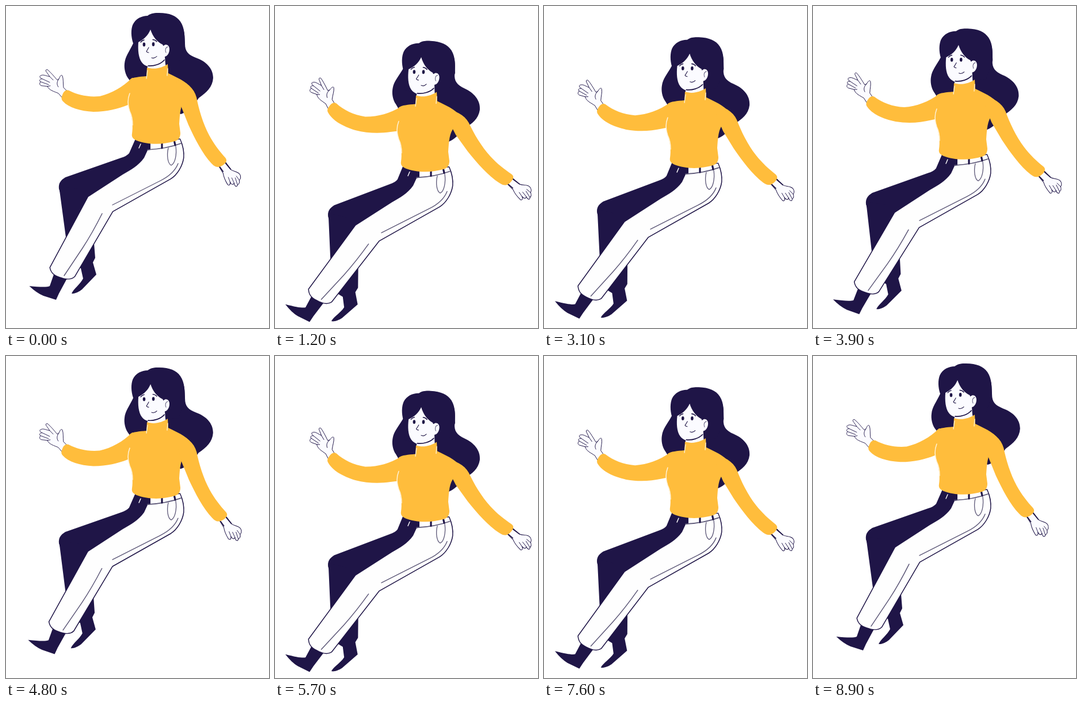
Recreate the animation shown at these times as an HTML page with a canvas. Size 457 by 560 pixels, loop 9 s.

```html
<!DOCTYPE html>
<html lang="en">
<head>
<meta charset="utf-8">
<title>Floating woman</title>
<style>
html, body { margin: 0; width: 100%; height: 100%; overflow: hidden; background: #fff; }
canvas { display: block; width: 457px; height: 560px; }
</style>
</head>
<body>
<canvas id="stage" width="457" height="560"></canvas>
<script>
const ctx = document.getElementById('stage').getContext('2d');
const NAVY = '#1f1547', YELLOW = '#ffbd3c', SKIN = '#fbfbff', CLOTH = '#fefefe';
const CREAM = '#fff3d8', SEAM = '#5d5878';
const LOOP = 9000, BOB = 2250, STEP = 100, RISE = 49;

const fill = (d, color) => {
  ctx.fillStyle = color;
  ctx.fill(new Path2D(d));
};
const line = (d, color = NAVY, width = 1.2) => {
  ctx.strokeStyle = color;
  ctx.lineWidth = width;
  ctx.stroke(new Path2D(d));
};

// One swing per bob, from 0 to 1 and back; power sharpens the crest.
const swing = (t, lag = 0, power = 1) =>
  ((1 - Math.cos(2 * Math.PI * (t - lag) / BOB)) / 2) ** power;

// Draws a part turned around its joint, with an optional shift down.
function joint(x, y, deg, draw, drop = 0) {
  ctx.save();
  ctx.translate(x, y + drop);
  ctx.rotate(deg * Math.PI / 180);
  ctx.translate(-x, -y);
  draw();
  ctx.restore();
}

function head(s) {
  joint(285, 50, 2.5 * s, () => fill(`M230 40 L302 30 C312 42 310 54 311 66
    C311 79 317 85 330 90 C347 96 360 108 360 125 C359 141 349 150 335 160
    C326 174 316 184 304 188 L240 165 L214 128 C207 120 205 108 206 100
    C207 88 214 80 221 65Z`, NAVY));
  fill(`M246 17 C252 12 260 12 266 12 C284 12 296 17 303 27 C311 39 310 52 311 66
    L300 100 L225 100 L221 65 C217 53 217 41 220 33 C225 22 236 17 246 17Z`, NAVY);
  fill(`M251 41 C247 51 240 58 230 63 C229 76 230 90 236 98 C239 102 243 104 246 105
    L245 116 L281 116 L277 101 L276 88 C281 87 284 81 284 75 C284 68 278 65 274 69
    C272 70 273 67 272 67 C262 62 255 53 251 41Z`, SKIN);
  line('M247 104 C257 105 269 101 275 94', NAVY, 1.7);
  fill('M242.2 67 A2.3 3.4 0 1 1 237.6 67 A2.3 3.4 0 1 1 242.2 67Z M258.3 66.5 A2.3 3.4 0 1 1 253.7 66.5 A2.3 3.4 0 1 1 258.3 66.5Z', NAVY);
  line('M234 63 Q236 60 240 59 M255 58.5 Q259 58.5 262 62', NAVY, 1.4);
  line('M248 72 Q246 76 244 79 Q245 81 248 81 M253 90 Q258 92 262 87.5', NAVY, 1.1);
  line('M281 71 C277 72 276 77 278 81', SEAM, 1);
}

function leftArm() {
  const hand = `M105 147 L100 142 C99 134 100 127 98 122 C97 119 94 121 92 127
    L89 129 C83 122 77 115 72 111 C69 110 68 113 71 116 L76 123
    C70 122 65 119 61 121 C57 122 59 126 63 127 C59 127 57 130 60 132
    C58 135 58 138 62 139 L72 140 C75 147 84 149 91 152 L98 160Z`;
  fill(hand, SKIN);
  line(hand, NAVY, 0.9);
  line('M76 123 L82 129 M63 127 L76 133 M60 132 L74 137 M92 127 C88 132 88 137 91 141 M72 140 L77 139', NAVY, 0.9);
  fill(`M219 125 C203 141 184 152 163 157 C143 159 124 155 109 147 C104 145 100 149 98 155
    C96 159 96 163 99 166 C109 177 129 183 152 184 C175 184 195 179 212 172 L238 162 L230 126Z`, YELLOW);
}

function rightArm() {
  const hand = `M368 276 L377 291 C378 299 382 306 385 311 C388 313 390 310 389 306
    C391 311 395 312 396 308 C397 314 401 316 402 311 C405 310 406 306 405 303
    C408 301 408 296 406 293 C403 288 395 288 391 285 L380 270Z`;
  fill(hand, SKIN);
  line(hand, NAVY, 1);
  line('M370 278 L377 288 M381 273 L390 284', NAVY, 1.7);
  line('M389 306 L386 298 M396 308 L392 299 M402 311 L398 299 M405 303 L400 296', NAVY, 0.9);
  fill(`M296 125 C313 132 327 143 331 159 C335 180 342 204 353 225 C361 240 371 253 381 264
    C384 268 383 271 380 274 C376 278 371 280 368 280 C363 280 360 277 357 274
    C341 257 328 231 317 207 L304 174 L298 148Z`, YELLOW);
}

function rearLeg(kick) {
  joint(100, 305, -1.5 * kick, () => fill(`M225 231 L252 236 L255 258 L238 275 L150 345
    L100 342 L92 318 C91 308 95 303 103 298 L200 264 Q210 261 214 256Z`, NAVY));
  joint(110, 320, 5.6 * kick, () => fill(`M92 313 L104 402 L112 447 L130 456 L134 474
    C129 484 118 491 114 500 C119 501 127 497 132 493 L157 467 L151 446 L155 438
    L152 400 L150 340 L125 318Z`, NAVY));
}

const KNEE = { x: 148, y: 334 };

function frontLeg(kick) {
  const deg = 9.8 * kick, drop = 2 * kick;
  const c = Math.cos(deg * Math.PI / 180), n = Math.sin(deg * Math.PI / 180);
  const hem = (x, y) => {
    const dx = x - KNEE.x, dy = y - KNEE.y;
    return `${KNEE.x + dx * c - dy * n} ${KNEE.y + drop + dx * n + dy * c} `;
  };
  const shin = draw => joint(KNEE.x, KNEE.y, deg, draw, drop);
  const leg = `M251 238 L302 232 C306 241 309 253 308 264 C306 278 297 293 286 300
    L${185 - 5 * kick} ${357 + 3 * kick} L${hem(119, 470)}
    C${hem(113, 476)}${hem(104, 475)}${hem(93, 471)}
    C${hem(84, 468)}${hem(79, 464)}${hem(77, 455)}
    L${143 - 3 * kick} ${332 + 1.5 * kick} L203 293 C217 285 230 278 240 264 L246 251 L251 250Z`;

  shin(() => fill('M84 464 L76 487 Q70 490 40.5 487 Q53 499 65 504 L87 511 L92 500 L106 474Z', NAVY));
  line(leg, NAVY, 3);
  fill(leg, CLOTH);
  shin(() => line('M101 469 L133 421 Q150 395 167 361', SEAM, 1.5));
  line('M185 346 L268 304 C284 296 294 287 299 274', SEAM, 1.4);
  line('M246 250 C265 249 285 246 304 239', SEAM, 1.7);
  line('M282 247 C279 260 281 274 287 277 C294 274 297 258 295 244', SEAM, 1.3);
  line('M271 238 V247 M292 233 L294 242', NAVY, 3.2);
  line('M231 247 L234 240', CLOTH, 1.4);
}

function torso() {
  fill(`M245 107 C257 111 271 108 281 101 L282 117 C296 124 312 130 322 143 L312 162
    C303 171 302 188 301 205 L303 221 C303 228 300 233 294 235 C271 242 245 241 227 234
    C220 231 218 227 219 222 C221 209 219 198 217 189 C212 176 211 157 213 142
    L215 128 C220 124 232 123 244 122Z`, YELLOW);
  line('M246 112 L244 126 M281 109 L280 121', CREAM, 1.3);
  line('M215 152 C211 162 211 172 215 183 C219 191 220 200 220 207', CREAM, 1.5);
}

function draw(t) {
  const sway = swing(t, 100, 1.25);
  const kick = swing(t, -80, 1.85);
  ctx.fillStyle = '#fff';
  ctx.fillRect(0, 0, 457, 560);
  ctx.lineCap = ctx.lineJoin = 'round';
  ctx.save();
  ctx.translate(0, RISE * swing(t));
  joint(262, 112, 2.5 * sway, () => head(sway));
  joint(212, 125, 14.2 * sway, leftArm);
  rearLeg(kick);
  frontLeg(kick);
  torso();
  joint(316, 134, -14.3 * sway, rightArm);
  ctx.restore();
}

function tick() {
  const t = performance.now() % LOOP;
  draw(Math.floor(t / STEP) * STEP);
  requestAnimationFrame(tick);
}
tick();
</script>
</body>
</html>
```
